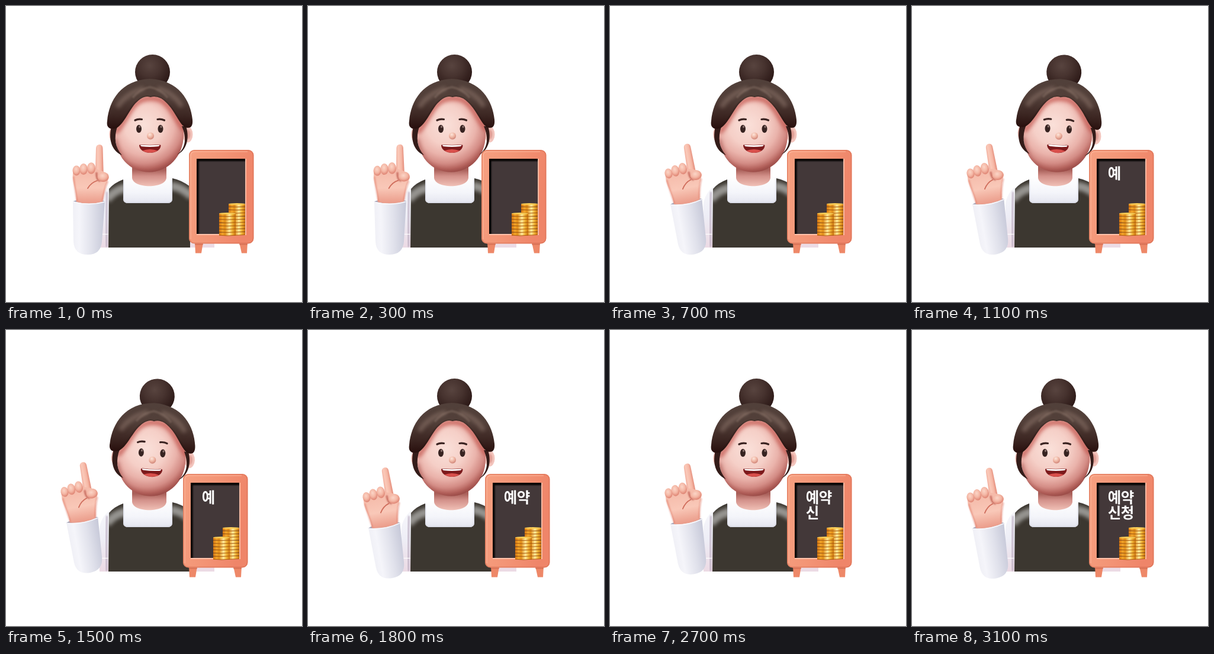
Recreate the animation shown at these times as an HTML page. Size 500 by 500 pixels, loop 6100 ms.

```html
<!DOCTYPE html>
<html lang="ko">
<head>
<meta charset="utf-8">
<style>
html, body { margin: 0; width: 100%; height: 100%; overflow: hidden; background: #fff; }
svg { display: block; width: 100%; height: 100%; }
text { font: 700 24.5px "Noto Sans CJK KR", "Noto Sans CJK", "Noto Sans CJK SC", sans-serif; fill: #fff; text-anchor: middle; }
</style>
</head>
<body>
<svg viewBox="0 0 500 500">
<defs>
  <radialGradient id="bunFill" cx=".42" cy=".32" r=".68">
    <stop offset="0" stop-color="#58443f"/><stop offset=".45" stop-color="#47332f"/><stop offset="1" stop-color="#2a1715"/>
  </radialGradient>
  <linearGradient id="hairFill" x2="0" y2="1">
    <stop offset="0" stop-color="#51403a"/><stop offset=".4" stop-color="#523f39"/><stop offset=".75" stop-color="#3b2521"/><stop offset="1" stop-color="#280f0d"/>
  </linearGradient>
  <radialGradient id="faceFill" gradientUnits="userSpaceOnUse" cx="233" cy="201" r="82">
    <stop offset="0" stop-color="#fae0d9"/><stop offset=".4" stop-color="#f5cfc7"/><stop offset=".62" stop-color="#eab3ab"/><stop offset=".79" stop-color="#d48d86"/><stop offset=".91" stop-color="#b5635d"/><stop offset="1" stop-color="#924743"/>
  </radialGradient>
  <radialGradient id="noseFill" cx=".4" cy=".3" r=".7">
    <stop offset="0" stop-color="#fde6dc"/><stop offset=".55" stop-color="#efb6a4"/><stop offset="1" stop-color="#d08578"/>
  </radialGradient>
  <linearGradient id="neckFill" x2="0" y2="1">
    <stop offset=".35" stop-color="#a9605a"/><stop offset=".6" stop-color="#d3918a"/><stop offset="1" stop-color="#f0c0b6"/>
  </linearGradient>
  <linearGradient id="shirtFill" x2="0" y2="1">
    <stop offset="0" stop-color="#fafafd"/><stop offset=".55" stop-color="#eeeef6"/><stop offset="1" stop-color="#ecdae4"/>
  </linearGradient>
  <linearGradient id="collarFill" x2="0" y2="1">
    <stop offset="0" stop-color="#fff"/><stop offset=".6" stop-color="#f4f5fa"/><stop offset="1" stop-color="#e4e5ef"/>
  </linearGradient>
  <linearGradient id="sleeveFill">
    <stop offset="0" stop-color="#f0f0f6"/><stop offset=".2" stop-color="#f5f5fa"/><stop offset=".6" stop-color="#e0e1eb"/><stop offset="1" stop-color="#c6c8d8"/>
  </linearGradient>
  <linearGradient id="skin" x2="0" y2="1">
    <stop offset="0" stop-color="#f4b9a8"/><stop offset=".55" stop-color="#f9c8b8"/><stop offset="1" stop-color="#ea9a88"/>
  </linearGradient>
  <radialGradient id="knuckle" cx=".45" cy=".35" r=".65">
    <stop offset="0" stop-color="#fbd5c7"/><stop offset=".55" stop-color="#f4b7a5"/><stop offset="1" stop-color="#de8271"/>
  </radialGradient>
  <linearGradient id="fingerFill">
    <stop offset="0" stop-color="#f0a897"/><stop offset=".3" stop-color="#fac9b9"/><stop offset=".65" stop-color="#f6b9a7"/><stop offset="1" stop-color="#e28775"/>
  </linearGradient>
  <linearGradient id="wood" x2="1" y2=".25">
    <stop offset="0" stop-color="#f6a081"/><stop offset=".5" stop-color="#f39576"/><stop offset="1" stop-color="#ef8569"/>
  </linearGradient>
  <linearGradient id="gold">
    <stop offset="0" stop-color="#d8760f"/><stop offset=".2" stop-color="#f2a52b"/><stop offset=".36" stop-color="#e08c18"/><stop offset=".62" stop-color="#ffeb9c"/><stop offset=".8" stop-color="#f0b436"/><stop offset="1" stop-color="#c9700d"/>
  </linearGradient>
  <filter id="soft" x="-50%" y="-50%" width="200%" height="200%"><feGaussianBlur stdDeviation="3"/></filter>
  <filter id="fine" x="-50%" y="-50%" width="200%" height="200%"><feGaussianBlur stdDeviation="1.3"/></filter>
  <path id="facePath" d="M184 214C184 172 205 150 243 150C281 150 300 176 300 218C300 254 273 280.500 242 280.500C208 280.500 184 254 184 214Z"/>
  <path id="hairPath" d="M171 194C174 160 194 125 243 123C292 125 312 160 315 192C316 203 312 208 303 205C291 199 284 170 262 156Q252 151 244 154Q236 151 227 157C209 169 203 196 187 206C175 210 169 205 171 194Z"/>
  <path id="apronPath" d="M173 408L174 309Q182 299 198 293V325Q198 333 206 333H273Q281 333 281 325V291Q296 294 311 305V408Z"/>
  <clipPath id="inFace"><use href="#facePath"/></clipPath>
  <clipPath id="inHair"><use href="#hairPath"/></clipPath>
  <clipPath id="inApron"><use href="#apronPath"/></clipPath>
  <clipPath id="inPanel"><path d="M312 258H395V386H312Z"/></clipPath>
</defs>

<g id="body">
  <path fill="url(#shirtFill)" d="M158 408V332Q163 312 178 303Q196 292 213 288H271Q300 291 326 308Q350 330 352 360V408Z"/>
  <path d="M171 314Q168 360 170 407" fill="none" stroke="#b9aabf" stroke-width="5" opacity=".6" filter="url(#fine)"/>
  <path d="M160 385.500H173" stroke="#fff" stroke-width="1.200"/>
  <use href="#apronPath" fill="#3c3730"/>
  <g clip-path="url(#inApron)">
    <path d="M170 327Q184 310 203 307M278 304Q296 305 314 322" fill="none" stroke="#b4b3b0" stroke-width="14" opacity=".75" filter="url(#soft)"/>
    <path d="M174 312V408" stroke="#8b8588" stroke-width="2" opacity=".6" filter="url(#fine)"/>
    <path d="M307 325V408" stroke="#14100f" stroke-width="4" filter="url(#fine)"/>
  </g>
  <path fill="url(#collarFill)" d="M198 292Q206 289 213 288H271L281 291V325Q281 333 273 333H206Q198 333 198 325Z"/>
  <path d="M199 294V325Q199 332 206 332H273Q280 332 280 325V293" fill="none" stroke="#d5d7e3"/>
  <path fill="url(#neckFill)" d="M213 262H271V290C270 309 214 309 213 290Z"/>
</g>

<g id="head">
  <circle cx="247.500" cy="111.500" r="29.500" fill="url(#bunFill)"/>
  <ellipse cx="182" cy="217" rx="7.500" ry="14" fill="#eab3aa"/>
  <ellipse cx="307" cy="217" rx="8.500" ry="13.500" fill="#f3c5bd"/>
  <ellipse cx="307" cy="217" rx="4.500" ry="8" fill="#df9d94" filter="url(#fine)"/>
  <use href="#facePath" fill="url(#faceFill)"/>
  <g clip-path="url(#inFace)" fill="none">
    <path d="M185 214C204 196 207 170 229 159Q244 153 261 159C283 172 286 196 302 210" stroke="#c2544e" stroke-width="8" opacity=".75" filter="url(#soft)"/>
    <path d="M185 225Q194 281 242 281Q280 281 300 240" stroke="#a3504b" stroke-width="6" opacity=".6" filter="url(#soft)"/>
  </g>
  <path fill="#341c19" d="M178 204C172 229 181 246 196 252C184 239 182 222 188 204ZM297 203C306 224 303 241 289 251C304 245 311 224 304 203Z"/>
  <use href="#hairPath" fill="url(#hairFill)"/>
  <g clip-path="url(#inHair)" fill="none">
    <path d="M188 171Q202 148 233 139M256 139Q283 146 297 170" stroke="#8a7268" stroke-width="8" opacity=".6" filter="url(#soft)"/>
    <path d="M214 155Q226 140 243 137Q261 140 273 155" stroke="#8e776c" stroke-width="4" opacity=".4" filter="url(#fine)"/>
    <path d="M187 207C203 196 209 169 227 158Q236 152 244 155Q252 152 262 157C284 171 291 199 303 206" stroke="#241310" stroke-width="3" opacity=".6" filter="url(#fine)"/>
  </g>
  <path id="brows" d="M218 193Q223 190.500 229.500 191.500M256 191.500Q262 190.500 267.500 193" fill="none" stroke="#3b2422" stroke-width="3.200" stroke-linecap="round"/>
  <g fill="#372321">
    <ellipse cx="224.500" cy="207.500" rx="4.500" ry="6.800"/><ellipse cx="261" cy="207.500" rx="4.500" ry="6.800"/>
  </g>
  <g fill="#8d7470">
    <ellipse cx="225.500" cy="204" rx="1.500" ry="2"/><ellipse cx="262" cy="204" rx="1.500" ry="2"/>
  </g>
  <circle cx="244" cy="219.500" r="6" fill="url(#noseFill)"/>
  <path fill="#7c1a1c" d="M225 236Q225 234 228 234Q243 235.500 258 234Q261.500 234 261.500 236C260 252 227 252 225 236Z"/>
  <path fill="#d94f4b" d="M230 244.500Q243 239.500 256.500 244.500Q243 251.500 230 244.500Z"/>
  <path fill="#fff" d="M227 234.500Q243 236 259.500 234.500Q259.500 237 256 237.300Q243 238.500 230 237.300Q227 237 227 234.500Z"/>
</g>

<g id="hand">
  <ellipse cx="140" cy="330.500" rx="27" ry="3.500" fill="#a9aabd"/>
  <path fill="url(#fingerFill)" d="M152 240Q152.500 234 158 234Q163 234 163.500 240L165 292H150.500Z"/>
  <path fill="url(#skin)" d="M113 281Q140 268 165 280Q174 282 174 290Q171 297 168 304Q165 318 163 331Q140 337 119 331Q119 317 115 303Q112 291 113 281Z"/>
  <path d="M114 288Q116 304 120 330M172 296Q166 309 163 329" fill="none" stroke="#e07c69" stroke-width="2.500" opacity=".6" filter="url(#fine)"/>
  <g fill="url(#knuckle)">
    <ellipse cx="119" cy="278" rx="6.500" ry="8.500"/>
    <ellipse cx="131" cy="275.500" rx="6.800" ry="9.500"/>
    <ellipse cx="144" cy="274" rx="7" ry="9.800"/>
  </g>
  <path d="M153 281Q152 293 159 296" fill="none" stroke="#b95346" stroke-width="3" opacity=".8" filter="url(#fine)"/>
  <ellipse cx="164" cy="289" rx="9.500" ry="8" fill="url(#knuckle)"/>
  <path d="M154 295Q144 298 138 308" fill="none" stroke="#cf6d5c" stroke-width="1.800" stroke-linecap="round"/>
  <path fill="url(#sleeveFill)" d="M113 330Q140 337 167 330L162 398Q160 420 138 420Q115 420 114 398Z"/>
  <path d="M113.500 331Q140 338 166.500 331" fill="none" stroke="#fafafd" stroke-width="1.500"/>
</g>

<g id="board">
  <path d="M300 252V397" stroke="#000" stroke-width="7" opacity=".4" filter="url(#fine)"/>
  <path fill="#ee8868" d="M309 399H323L320 417.500H310ZM384 399H398L397 417.500H388Z"/>
  <path d="M309 402H323M384 402H398" stroke="#c8634a" stroke-width="3" opacity=".6"/>
  <rect x="299" y="243" width="109.500" height="158.500" rx="9" fill="url(#wood)"/>
  <rect x="300" y="244" width="107.500" height="156.500" rx="8" fill="none" stroke="#d86f53" stroke-width="1.500" opacity=".6"/>
  <path d="M302 394V253Q302 246 309 246H398" fill="none" stroke="#ffbfa3" stroke-width="1.500" opacity=".6"/>
  <path fill="#433839" d="M312 258H395V386H312Z"/>
  <path d="M313 390V259.500H398" fill="none" stroke="#060404" stroke-width="5" clip-path="url(#inPanel)" filter="url(#fine)"/>
  <path d="M395 258V386H312" fill="none" stroke="#ffc2aa" stroke-width="1.800"/>
  <g id="coins"></g>
  <g id="words"></g>
</g>
</svg>

<script>
const $ = id => document.getElementById(id);
const LOOP = 6100, STEP = 100;

function coinStack(x, top, count, gap) {
  let out = '';
  for (let i = count - 1; i >= 0; i--) {
    const y = top + 1.2 + i * gap;
    out += `<path fill="url(#gold)" d="M${x} ${y}h28v${gap - 0.8}q-14 1.600-28 0z"/>` +
      `<path d="M${x} ${y + gap - 0.8}q14 1.600 28 0" fill="none" stroke="#a8560a" stroke-width=".9"/>`;
  }
  return out + `<ellipse cx="${x + 14}" cy="${top + 1.4}" rx="14" ry="1.400" fill="#fbcf58"/>`;
}
$('coins').innerHTML = coinStack(366, 333, 10, 5.3) + coinStack(350, 349, 7, 5.4);

// Each syllable grows from its own centre.
const words = [['예', 342, 283, 800], ['약', 364, 283, 1500], ['신', 342, 309, 2050], ['청', 364, 309, 2700]];
$('words').innerHTML = words.map(w => `<text y="9.3">${w[0]}</text>`).join('');
const glyphs = [...$('words').children];

const clamp = v => Math.min(1, Math.max(0, v));

function track(t, keys) {
  let value = keys[0][1];
  for (let i = 1; i < keys.length; i++) {
    const [t0, v0] = keys[i - 1], [t1, v1] = keys[i];
    if (t >= t0) value = v0 + (v1 - v0) * (1 - Math.cos(Math.PI * clamp((t - t0) / (t1 - t0)))) / 2;
  }
  return value;
}

const slide = [[0, 10], [300, -6], [700, 0]];
const turn = [[200, 0], [700, -10]];
const lift = [[1100, 0], [1500, -9.5], [1850, 0], [1900, 0], [2350, -9.5], [2500, -9.5], [3100, 0]];
const tilt = [[700, 0], [1100, 2.8], [1400, 2.8], [1800, 0]];
const raise = [[1100, 0], [1500, -2.5], [1800, 0]];

function draw(now) {
  const t = Math.floor(now % LOOP / STEP) * STEP;
  const set = (el, value) => el.setAttribute('transform', value);
  set($('board'), `translate(${track(t, slide)} 0)`);
  set($('hand'), `translate(0 ${track(t, lift)}) rotate(${track(t, turn)} 137 395)`);
  set($('head'), `rotate(${track(t, tilt)} 242 300)`);
  set($('brows'), `translate(0 ${track(t, raise)})`);
  glyphs.forEach((g, i) => {
    const [, x, y, start] = words[i];
    const s = clamp((t - start) / 300);
    g.style.display = s ? '' : 'none';
    set(g, `translate(${x} ${y}) scale(${s})`);
  });
}

let begin;
function tick(now) {
  begin ??= now;
  draw(now - begin);
  requestAnimationFrame(tick);
}
draw(0);
requestAnimationFrame(tick);
</script>
</body>
</html>
```
